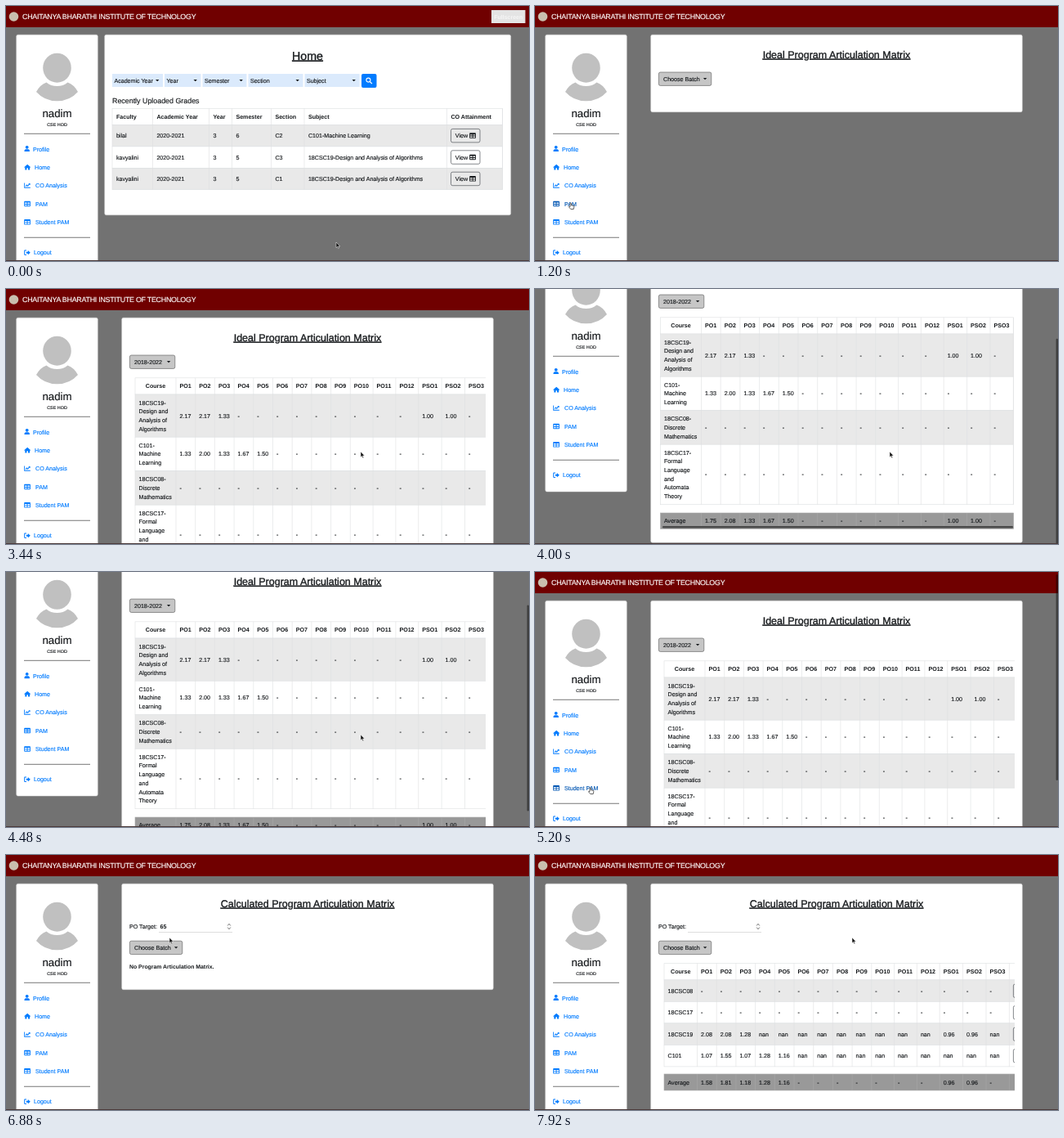
An HTML page for the animation above (8000 ms loop, 640 by 312 pixels).

```html
<!DOCTYPE html>
<html lang="en">
<head>
<meta charset="utf-8">
<title>Program Articulation Matrix</title>
<style>
html, body { margin: 0; width: 100%; height: 100%; overflow: hidden; background: #727272; }
svg { display: block; width: 640px; height: 312px; color: #15181b; }
text { font-family: "Liberation Sans", Arial, sans-serif; font-size: 7.11px; fill: currentColor;
  stroke: currentColor; stroke-width: .15px; text-rendering: geometricPrecision; white-space: pre; }
.b { font-weight: bold; stroke: none; }
.title { text-decoration: underline; stroke-width: .32px; text-anchor: middle; }
.mid { text-anchor: middle; }
.link { color: #007bff; }
.link.on { color: #0056b3; }
</style>
</head>
<body>
<svg id="stage" viewBox="0 0 640 312">
  <defs>
    <clipPath id="wrap"><rect x="151" y="100" width="436" height="300"/></clipPath>
  </defs>
</svg>
<script>
const LOOP = 8000, STEP = 80;
const stage = document.getElementById('stage');

function el(parent, tag, attrs = {}) {
  const node = document.createElementNS('http://www.w3.org/2000/svg', tag);
  for (const k in attrs) node.setAttribute(k, attrs[k]);
  return parent.appendChild(node);
}
const group = (p, attrs) => el(p, 'g', attrs);
const path = (p, d, attrs) => el(p, 'path', { d, ...attrs });
const rect = (p, x, y, width, height, fill, attrs) =>
  el(p, 'rect', { x, y, width, height, fill, ...attrs });
function text(p, x, y, str, cls = '', size, color) {
  const t = el(p, 'text', { x, y, class: cls });
  if (size) t.style.fontSize = size + 'px';
  if (color) t.style.color = color;
  t.textContent = str;
  return t;
}
const show = (node, on) => node.setAttribute('display', on ? 'inline' : 'none');
const card = (p, x, y, w, h) => rect(p, x, y, w, h, '#fff', { rx: 2, stroke: '#d4d4d4', 'stroke-width': .5 });
const caret = (p, x, y) => path(p, `M${x} ${y}h4.4l-2.2 2.3z`, { fill: '#15181b' });

const ICONS = {
  user: 'M3.5 0a1.9 1.9 0 1 1-.01 0zM.3 7.2V6Q.5 4.4 2 4.3H5Q6.5 4.4 6.7 6V7.2Z',
  home: 'M4 .4L8 3.9 7.5 4.5 6.9 4V7.2H4.8V5H3.2V7.2H1.1V4L.5 4.5 0 3.9Z',
  chart: 'M0 .8H.9V6.2H7.6V7.1H0ZM1.6 4.6L3.2 2.7 4.3 3.8 5.8 2.1 5.2 1.5H7.4V3.7L6.6 2.9 4.3 5.3 3.2 4.1 2.2 5.3Z',
  table: 'M.7 .7H7Q7.7 .7 7.7 1.4V6.6Q7.7 7.2 7 7.2H.7Q0 7.2 0 6.6V1.4Q0 .7 .7 .7ZM.9 2.6V4H3.4V2.6ZM4.3 2.6V4H6.8V2.6ZM.9 4.9V6.3H3.4V4.9ZM4.3 4.9V6.3H6.8V4.9Z',
  exit: 'M0 1.6Q0 .8 .8 .8H2.8V1.7H1V6.3H2.8V7.2H.8Q0 7.2 0 6.4ZM2.6 3H4.6V1.2L7.6 4 4.6 6.8V5H2.6Z'
};
const icon = (p, name, x, y, fill = 'currentColor') =>
  path(p, ICONS[name], { fill, 'fill-rule': 'evenodd', transform: `translate(${x} ${y})` });

function viewButton(p, x, y) {
  rect(p, x, y, 35.5, 16.5, 'none', { rx: 2, stroke: '#343a40', 'stroke-width': .6 });
  text(p, x + 5.3, y + 10.7, 'View');
  icon(p, 'table', x + 22.7, y + 4.2);
}

function batchButton(p, y, label, w) {
  rect(p, 151.4, y + .4, w, 16.4, '#c6c6c6', { rx: 2, stroke: '#555', 'stroke-width': .6 });
  text(p, 157, y + 10.9, label);
  caret(p, 151 + w - 9.5, y + 7.4);
}

function dropdown(p, y) {
  const g = group(p);
  rect(g, 151, y, 72, 17, '#30363b');
  text(g, 187, y + 11.2, '2018-2022', 'mid', 0, '#fff');
  return g;
}

// rows: { h, cells, bg, bold }; a cell holds lines parted by "|"
function table(p, x, y, widths, rows, pad, line = '#dddfe1', centreFirst = false) {
  const total = widths.reduce((a, b) => a + b);
  const top = y;
  for (const { h, cells, bg, bold } of rows) {
    rect(p, x, y, total, h, bg || '#fff', { stroke: line, 'stroke-width': .6 });
    let cx = x;
    cells.forEach((cell, i) => {
      const lines = cell.split('|');
      const first = y + h / 2 + 2.5 - (lines.length - 1) * 5.335;
      const mid = centreFirst && bold && i === 0;
      lines.forEach((s, n) => text(p, mid ? cx + widths[0] / 2 : cx + pad, first + n * 10.67, s,
        (bold ? 'b ' : '') + (mid ? 'mid' : '')));
      cx += widths[i];
    });
    y += h;
  }
  let cx = x;
  for (const w of widths) {
    path(p, `M${cx += w} ${top}V${y}`, { stroke: line, 'stroke-width': .6 });
  }
}

const GREY = '#e9e9e9', DARK = '#999';
const PO = Array.from({ length: 12 }, (_, i) => 'PO' + (i + 1));
const HEAD = ['Course', ...PO, 'PSO1', 'PSO2', 'PSO3'];
const outcomeWidths = [...Array(9).fill(23.7), ...Array(3).fill(27.8), ...Array(3).fill(28.4)];
function marks(name, po = '', pso = '', fill = '-') {
  const fit = (s, n) => Array.from({ length: n }, (_, i) => s.split(' ')[i] || fill);
  return [name, ...fit(po, 12), ...fit(pso, 3)];
}

function buildHome(g) {
  card(g, 120.7, 35.2, 497, 220.6);
  text(g, 369, 65.5, 'Home', 'title', 14.2);
  [['Academic Year', 130, 62], ['Year', 194, 44.5], ['Semester', 240.5, 54], ['Section', 296.5, 67], ['Subject', 365.5, 67]]
    .forEach(([label, x, w]) => {
      rect(g, x, 83, w, 16, '#dbeafc');
      text(g, x + 2.4, 93.6, label);
      caret(g, x + w - 9, 90);
    });
  rect(g, 435, 83, 18.5, 17, '#007bff', { rx: 2 });
  el(g, 'circle', { cx: 443.4, cy: 90.6, r: 2.5, fill: 'none', stroke: '#fff', 'stroke-width': 1.1 });
  path(g, 'M445.3 92.5L447.9 95.1', { stroke: '#fff', 'stroke-width': 1.3 });
  text(g, 130, 119, 'Recently Uploaded Grades', '', 8.89);
  const algo = '18CSC19-Design and Analysis of Algorithms';
  const row = (who, sem, sec, subject, bg) =>
    ({ h: 26.4, bg, cells: [who, '2020-2021', '3', sem, sec, subject] });
  table(g, 130, 125.3, [49.5, 69, 28, 48, 40.5, 174.5, 68], [
    { h: 20.2, bold: true, cells: ['Faculty', 'Academic Year', 'Year', 'Semester', 'Section', 'Subject', 'CO Attainment'] },
    row('bilal', '6', 'C2', 'C101-Machine Learning', GREY),
    row('kavyalini', '5', 'C3', algo),
    row('kavyalini', '5', 'C1', algo, GREY)
  ], 4.9);
  for (let i = 0; i < 3; i++) viewButton(g, 544.5, 150.4 + i * 26.4);
  rect(g, 594, 5, 41.5, 16, '#e4e4e4');
  text(g, 614.7, 15.6, 'Fullscreen', 'mid b', 7, '#f6f6f6');
}

function buildIdeal(g) {
  card(g, 141.7, 35.2, 454.6, 94.5);
  text(g, 369, 63.6, 'Ideal Program Articulation Matrix', 'title', 12.5);
  batchButton(g, 80.6, 'Choose Batch', 64.4);
  return dropdown(g, 98.3);
}

function buildMatrix(g) {
  card(g, 141.7, 35.2, 454.6, 349);
  text(g, 369, 63.6, 'Ideal Program Articulation Matrix', 'title', 12.5);
  batchButton(g, 80.6, '2018-2022', 55.4);
  const wrap = group(g, { 'clip-path': 'url(#wrap)' });
  const slide = group(wrap);
  const widths = [50, ...outcomeWidths];
  table(slide, 158, 108.8, widths, [
    { h: 20.2, bold: true, cells: HEAD },
    { h: 52.2, bg: GREY, cells: marks('18CSC19-|Design and|Analysis of|Algorithms', '2.17 2.17 1.33', '1.00 1.00') },
    { h: 41.5, cells: marks('C101-|Machine|Learning', '1.33 2.00 1.33 1.67 1.50') },
    { h: 41.5, bg: GREY, cells: marks('18CSC08-|Discrete|Mathematics') },
    { h: 73.5, cells: marks('18CSC17-|Formal|Language|and|Automata|Theory') }
  ], 4.5, undefined, true);
  table(slide, 158, 348, widths, [
    { h: 19.5, bg: DARK, cells: marks('Average', '1.75 2.08 1.33 1.67 1.50', '1.00 1.00') }
  ], 4.5, '#a8a8a8');
  const bar = rect(wrap, 156, 364, 429, 2.6, '#4a4a4a', { rx: 1.3 });
  return { slide, bar };
}

function buildTarget(g, cardHeight) {
  card(g, 141.7, 35.2, 454.6, cardHeight);
  text(g, 369, 63.6, 'Calculated Program Articulation Matrix', 'title', 12.5);
  text(g, 151, 90, 'PO Target:');
  rect(g, 187, 94, 90, .7, '#cfcfcf');
  path(g, 'M271.2 86.5L273 84.2 274.8 86.5M271.2 88.5L273 90.8 274.8 88.5',
    { fill: 'none', stroke: '#555', 'stroke-width': .8 });
  batchButton(g, 104.8, 'Choose Batch', 64.4);
}

function buildCalcEmpty(g) {
  buildTarget(g, 129.5);
  text(g, 151, 139.3, 'No Program Articulation Matrix.', 'b', 6.9);
  return {
    value: text(g, 188.6, 90, '', 'b'),
    blink: rect(g, 188, 82.5, .8, 9, '#333'),
    menu: dropdown(g, 122.5)
  };
}

function buildCalcTable(g) {
  buildTarget(g, 300);
  const wrap = group(g, { 'clip-path': 'url(#wrap)' });
  const widths = [40.5, ...outcomeWidths, 45];
  const row = (cells, bg) => ({ h: 26.5, cells, bg });
  table(wrap, 158, 132.7, widths, [
    { h: 20.2, bold: true, cells: HEAD },
    row(marks('18CSC08'), GREY),
    row(marks('18CSC17')),
    row(marks('18CSC19', '2.08 2.08 1.28', '0.96 0.96', 'nan'), GREY),
    row(marks('C101', '1.07 1.55 1.07 1.28 1.16', '', 'nan'))
  ], 4.5, undefined, true);
  for (let i = 0; i < 4; i++) viewButton(wrap, 585.4, 158 + i * 26.5);
  table(wrap, 158, 268, widths, [
    { h: 20, bg: DARK, cells: marks('Average', '1.58 1.81 1.18 1.28 1.16', '0.96 0.96') }
  ], 4.5, '#a8a8a8');
}

function buildFrame(g) {
  rect(g, 0, 0, 640, 26, '#700000');
  el(g, 'circle', { cx: 9.5, cy: 13, r: 5.8, fill: '#c9bfae' });
  text(g, 20, 16.1, 'CHAITANYA BHARATHI INSTITUTE OF TECHNOLOGY', '', 8.89, '#fff').style.letterSpacing = '-.26px';
  card(g, 12.7, 35.2, 99.6, 286.8);
  el(g, 'ellipse', { cx: 62.5, cy: 75.7, rx: 17.3, ry: 18, fill: '#c0c0c0' });
  path(g, 'M37 105Q42 96 49.5 93.5C56 99.5 69 99.5 75.5 93.5Q83 96 88 105Q78 116.3 62.5 116.3Q47 116.3 37 105Z', { fill: '#c0c0c0' });
  text(g, 62.5, 135.8, 'nadim', 'mid', 13.3);
  text(g, 62.5, 146.8, 'CSE HOD', 'mid', 5.4);
  for (const y of [155.8, 282.8]) rect(g, 22, y, 81, .8, '#555');
  return [['Profile', 'user', 33, 177.5], ['Home', 'home', 35, 199.9], ['CO Analysis', 'chart', 36, 222.2],
    ['PAM', 'table', 36, 244.6], ['Student PAM', 'table', 36, 267], ['Logout', 'exit', 34, 304.3]]
    .map(([label, name, x, y]) => {
      const link = group(g, { class: 'link' });
      icon(link, name, 22.2, y - 6.6);
      text(link, x, y, label);
      return { link, y: y - 2.5 };
    });
}

const page = group(stage);
const links = buildFrame(page);
const scenes = [0, 1200, 2960, 5280, 7280].map(start => ({ start, g: group(page) }));
buildHome(scenes[0].g);
const idealMenu = buildIdeal(scenes[1].g);
const { slide, bar } = buildMatrix(scenes[2].g);
const form = buildCalcEmpty(scenes[3].g);
buildCalcTable(scenes[4].g);

const thumb = rect(stage, 637.6, 0, 2.4, 252, 'rgba(0, 0, 0, .45)', { rx: 1.2 });
rect(stage, 0, 311, 640, 1, '#4b3a3a');
const pointer = group(stage);
const ink = { fill: '#111', stroke: '#fff', 'stroke-width': .5 };
const arrow = path(pointer, 'M0 0V6.7L1.5 5.4 2.5 7.7 3.6 7.2 2.6 5H4.7Z', ink);
const hand = path(pointer, 'M1 .3Q1.8-.4 2.4 .4V2.8L5.4 3.4Q6 3.7 5.8 4.8L5.2 7.6H1.8L-.6 4.8Q-.4 3.8 1 4.6Z',
  { fill: '#fff', stroke: '#222', 'stroke-width': .7 });

// time, then values
const MOUSE = [
  [400, 404, 289], [480, 270, 262], [560, 122, 237], [640, 122, 237], [1040, 42, 241],
  [2000, 42, 241], [2240, 184, 90], [2400, 184, 101], [2880, 184, 101], [3360, 434, 199],
  [4640, 434, 199], [5120, 66, 264], [6480, 66, 264], [6880, 200, 101], [7040, 190, 113],
  [7200, 188, 129], [7280, 188, 129], [7760, 388, 101]
];
const SCROLL = [[3440, 0], [3840, 74], [4320, 74], [4720, 0]];
const SLIDE = [[3920, 0], [4000, 4.5], [4080, 4.5], [4240, 0]];

function at(keys, t) {
  const n = keys.findIndex(k => k[0] > t);
  if (n === 0) return keys[0].slice(1);
  if (n < 0) return keys[keys.length - 1].slice(1);
  const a = keys[n - 1], b = keys[n];
  const u = (t - a[0]) / (b[0] - a[0]);
  const e = u * u * (3 - 2 * u);
  return a.slice(1).map((v, i) => v + (b[i + 1] - v) * e);
}

function draw(t) {
  scenes.forEach((s, i) => show(s.g, t >= s.start && t < (scenes[i + 1]?.start ?? LOOP)));
  const [scroll] = at(SCROLL, t);
  page.setAttribute('transform', `translate(0 ${-scroll})`);
  slide.setAttribute('transform', `translate(${-at(SLIDE, t)[0]} 0)`);
  show(bar, t >= 3920 && t < 4720);
  show(thumb, t >= 3520 && t < 5280);
  thumb.setAttribute('y', 3 + scroll * .78);

  show(idealMenu, t >= 2320);
  show(form.menu, t >= 7120);
  show(form.blink, t >= 6160 && t < 6400);
  form.value.textContent = '65'.slice(0, t < 6400 ? 0 : t < 6560 ? 1 : 2);

  const [x, y] = at(MOUSE, t);
  let over = false;
  for (const { link, y: ly } of links) {
    const on = x > 20 && x < 80 && Math.abs(y + scroll - ly) < 6;
    link.classList.toggle('on', on);
    over ||= on;
  }
  show(hand, over);
  show(arrow, !over);
  pointer.setAttribute('transform', `translate(${x} ${y})`);
}

function tick() {
  const t = performance.now() % LOOP;
  draw(Math.floor(t / STEP) * STEP);
  requestAnimationFrame(tick);
}
tick();
</script>
</body>
</html>
```
